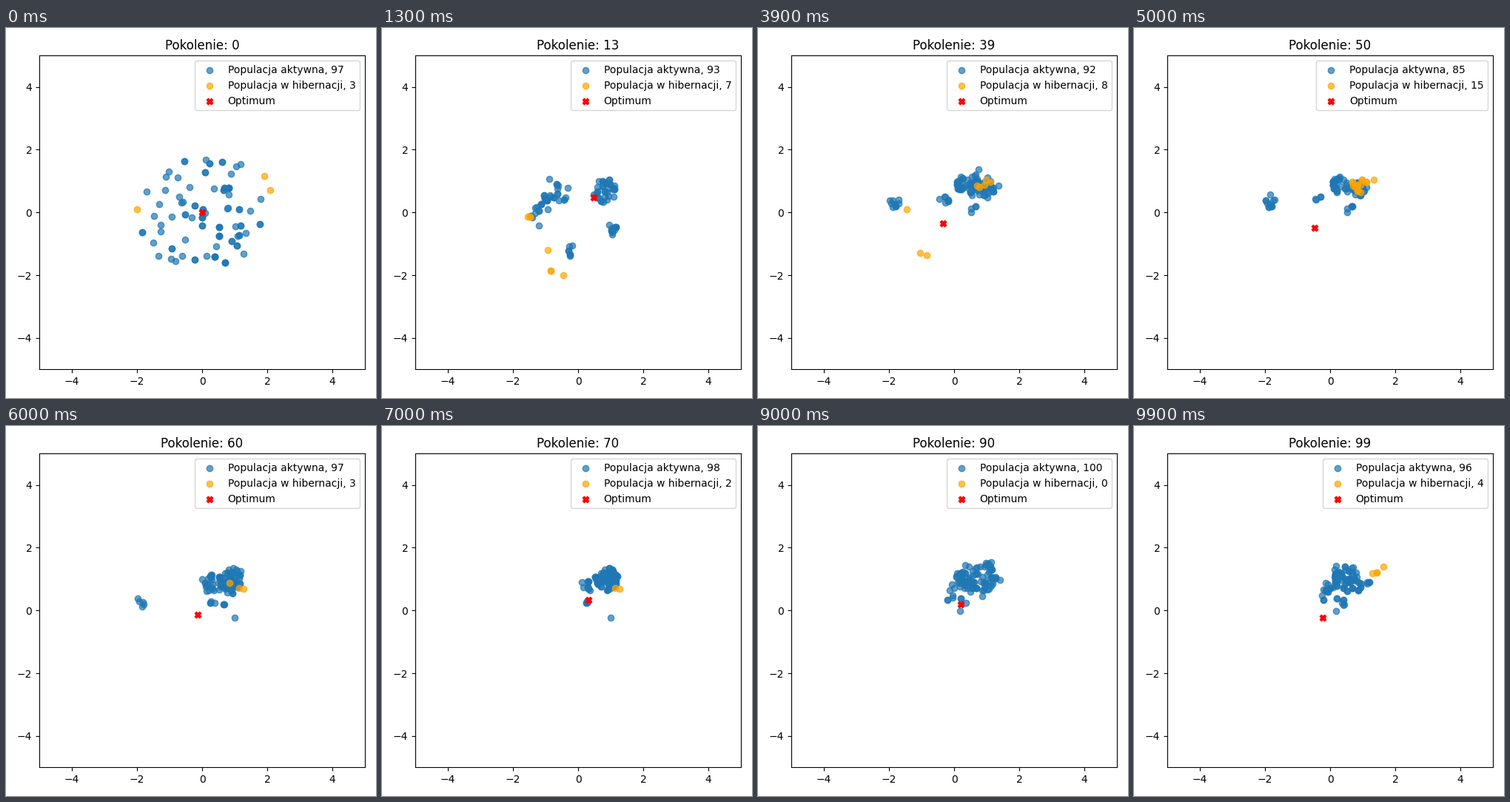
A matplotlib script that plays this animation: 500x500 px, repeating every 10 s.

```python
import numpy as np
import matplotlib.pyplot as plt
from matplotlib.animation import FuncAnimation

SIZE = 100          # individuals in the population
GENERATIONS = 100

seed = np.random.default_rng(7)


def blob(x, y, radius, count):
    """Round cluster in which about a third of the individuals are exact copies."""
    unique = int(np.ceil(.64 * count))
    r = radius * seed.random(unique) ** .55
    a = seed.uniform(0, 2 * np.pi, unique)
    pts = np.column_stack([x + r * np.cos(a), y + r * np.sin(a)])
    return np.vstack([pts, pts[seed.integers(unique, size=count - unique)]])


def pose(active, hibernated=()):
    """Positions of all individuals, hibernated first, and the hibernation mask."""
    asleep = sum(len(b) for b in hibernated)
    return np.vstack([*hibernated, *active]), np.arange(SIZE) < asleep


# Where the population gathers at a few chosen generations
KEYS = {
    0: pose([blob(0, 0, 1.95, 97)],
            [blob(1.55, 1, .65, 2), blob(-2, .1, 0, 1)]),
    13: pose([blob(.75, .7, .4, 38), blob(-.7, .72, .45, 24),
              blob(-1.2, -.05, .4, 13), blob(1.08, -.53, .2, 11),
              blob(-.25, -1.2, .2, 7)],
             [blob(-1.5, -.1, .15, 3), blob(-.55, -1.5, .5, 4)]),
    28: pose([blob(.5, .88, .36, 42), blob(1.08, .9, .28, 30),
              blob(-.22, .6, .26, 14), blob(-1.25, -.2, .2, 4),
              blob(.9, -.46, .06, 3)],
             [blob(-1.5, 0, .25, 4), blob(-.9, -1.23, .18, 3)]),
    50: pose([blob(.33, .88, .3, 37), blob(.9, .72, .28, 27),
              blob(.6, .1, .2, 6), blob(-1.8, .25, .34, 11),
              blob(-.38, .48, .1, 4)],
             [blob(1, 1, .36, 15)]),
    70: pose([blob(.88, 1, .37, 80), blob(.22, .73, .23, 12),
              blob(.25, .27, .05, 5), blob(1, -.23, 0, 1)],
             [blob(1.26, .68, .13, 2)]),
    81: pose([blob(.9, 1.35, .36, 34), blob(1.2, .85, .33, 30),
              blob(.22, .8, .36, 33), blob(.4, -.05, .25, 3)]),
    99: pose([blob(.57, .98, .45, 60), blob(.12, 1.25, .18, 8),
              blob(-.05, .58, .32, 16), blob(.27, .17, .24, 8),
              blob(1.2, .9, .18, 4)],
             [blob(1.5, 1.23, .24, 4)]),
}
GENS = list(KEYS)


def population(gen):
    """Individuals are replaced one by one between poses; some mutate on the way."""
    k = min(np.searchsorted(GENS, gen, "right") - 1, len(GENS) - 2)
    g0, g1 = GENS[k:k + 2]
    (p0, h0), (p1, h1) = KEYS[g0], KEYS[g1]

    rng = np.random.default_rng(k)
    swap = rng.uniform(.05, .8, SIZE)
    wake, sleep = h0 & ~h1, h1 & ~h0
    swap[wake] = rng.uniform(.1, .6, wake.sum())
    swap[sleep] = rng.uniform(.45, .95, sleep.sum())

    new = (gen - g0) / (g1 - g0) >= swap
    pts = np.where(new[:, None], p1, p0)
    hib = np.where(new, h1, h0)
    if gen not in KEYS:
        rng = np.random.default_rng(1000 + gen)
        mutant = (rng.random(SIZE) < .25) & ~hib
        pts[mutant] += rng.normal(0, .1, (mutant.sum(), 2))
    return pts[~hib], pts[hib]


fig, ax = plt.subplots(figsize=(5, 5), dpi=100)
fig.subplots_adjust(left=.09, right=.97, bottom=.0775, top=.9255)


def update(gen):
    active, hib = population(gen)
    opt = .5 * np.sin(.1 * gen)
    ax.clear()
    ax.scatter(*active.T, color="tab:blue", alpha=.7,
               label=f"Populacja aktywna, {len(active)}")
    ax.scatter(*hib.T, color="orange", alpha=.7,
               label=f"Populacja w hibernacji, {len(hib)}")
    ax.scatter([opt], [opt], color="red", marker="X", label="Optimum")
    ax.set(xlim=(-5, 5), ylim=(-5, 5), title=f"Pokolenie: {gen}",
           xticks=range(-4, 5, 2), yticks=range(-4, 5, 2))
    ax.legend(loc="upper right")


anim = FuncAnimation(fig, update, frames=GENERATIONS, interval=100,
                     init_func=lambda: None, repeat=True, repeat_delay=0)
plt.show()
```
